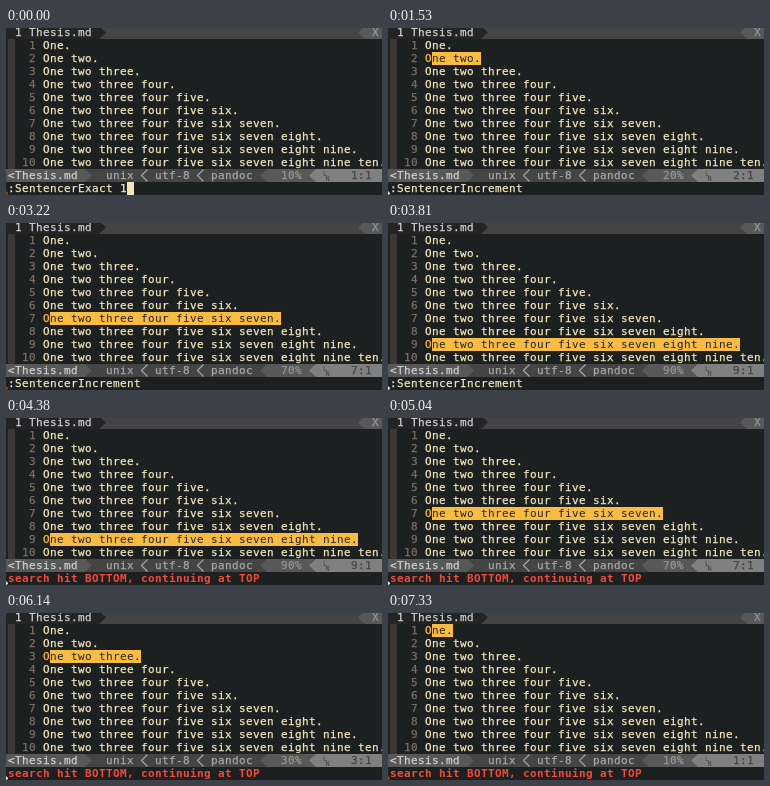
These frames come from a looping animation (376 by 167 pixels, 7.43 s). An HTML page with a canvas:

```html
<!DOCTYPE html>
<html lang="en">
<head>
<meta charset="utf-8">
<title>Sentence stepping</title>
<style>
html, body { margin: 0; width: 100%; height: 100%; overflow: hidden; background: #1d2021; }
canvas { display: block; }
</style>
</head>
<body>
<canvas id="stage" width="376" height="167"></canvas>
<script>
const ctx = document.getElementById('stage').getContext('2d');
const LOOP = 7430, CELL = 7, ROW = 13, LEFT = 2, TOP = -2;
const FONT = '11px "DejaVu Sans Mono", monospace';
const BG = '#1d2021', FG = '#f2e5bc', YELLOW = '#f9bc41', RED = '#f44a37';
const STATUS = 11, COMMAND = 12;

const words = 'One two three four five six seven eight nine ten'.split(' ');
const sentences = words.map((_, i) => words.slice(0, i + 1).join(' ') + '.');

// Moments at which the selection moves: down to line 10, then back up.
const down = [660, 1530, 1880, 2240, 2570, 2860, 3100, 3430, 3660, 3990];
const up = [4380, 4710, 5040, 5300, 5600, 5900, 6140, 6430, 6730];

const x = col => LEFT + col * CELL;
const y = row => TOP + row * ROW;

function fill(col, row, cols, color, rows = 1) {
  ctx.fillStyle = color;
  ctx.fillRect(x(col), y(row), cols * CELL, rows * ROW);
}

// Light text gets a hairline outline, as font smoothing thickens it.
function text(str, col, row, color, bold) {
  ctx.font = (bold ? 'bold ' : '') + FONT;
  ctx.fillStyle = ctx.strokeStyle = color;
  ctx.lineWidth = 0.25;
  [...str].forEach((ch, i) => {
    ctx.fillText(ch, x(col + i), y(row) + 10);
    if (color !== BG && !bold) ctx.strokeText(ch, x(col + i), y(row) + 10);
  });
}

// Triangle separator pointing right (dir 1) or left (dir -1).
function arrow(col, row, dir, color) {
  const base = dir > 0 ? x(col) : x(col + 1);
  ctx.beginPath();
  ctx.moveTo(base, y(row));
  ctx.lineTo(base + dir * CELL, y(row) + ROW / 2);
  ctx.lineTo(base, y(row) + ROW);
  ctx.fillStyle = color;
  ctx.fill();
}

function chevron(col, row, color) {
  ctx.beginPath();
  ctx.moveTo(x(col + 1) - 0.5, y(row) + 0.5);
  ctx.lineTo(x(col) + 0.5, y(row) + ROW / 2);
  ctx.lineTo(x(col + 1) - 0.5, y(row) + ROW - 0.5);
  ctx.strokeStyle = color;
  ctx.lineWidth = 1.2;
  ctx.stroke();
}

function drawTabs() {
  fill(-1, 0, 56, '#444444');
  fill(-1, 0, 14, '#242424');
  arrow(13, 0, 1, '#242424');
  text('1 Thesis.md', 1, 0, '#d0d0d0');
  arrow(50, 0, -1, '#585858');
  fill(51, 0, 4, '#585858');
  text('X', 52, 0, '#969696');
}

function drawStatus(line) {
  const dim = '#a8a8a8', dark = '#444444';
  fill(-1, STATUS, 56, dark);
  fill(-1, STATUS, 12, '#585858');
  arrow(11, STATUS, 1, '#585858');
  text('<Thesis.md', 0, STATUS, '#d0d0d0');
  text('unix', 14, STATUS, dim);
  chevron(19, STATUS, dim);
  text('utf-8', 21, STATUS, dim);
  chevron(27, STATUS, dim);
  text('pandoc', 29, STATUS, dim);
  arrow(36, STATUS, -1, '#585858');
  fill(37, STATUS, 7, '#585858');
  text((line * 10 + '%').padStart(4), 38, STATUS, '#969696');
  arrow(43, STATUS, -1, '#808080');
  fill(44, STATUS, 11, '#808080');
  ctx.fillStyle = dark;
  ctx.font = '7px "DejaVu Sans Mono", monospace';
  ctx.fillText('L', x(45), y(STATUS) + 7);
  ctx.fillText('N', x(45) + 2.5, y(STATUS) + 12);
  text((line + ':1').padStart(4), 48, STATUS, dark);
}

function drawBuffer(line, selected) {
  fill(0, 1, 1, '#3c3836', 10);
  sentences.forEach((sentence, i) => {
    const row = i + 1, active = selected && row === line;
    text(String(row).padStart(2), 2, row, '#7c6f64');
    if (active) fill(6, row, sentence.length - 1, YELLOW);
    text(sentence[0], 5, row, active ? YELLOW : FG);
    text(sentence.slice(1), 6, row, active ? BG : FG);
  });
}

function drawCommand(t) {
  if (t < down[0]) {
    text(':SentencerExact 1', 0, COMMAND, FG);
    fill(17, COMMAND, 1, FG);
  } else if (t >= down[1] && t < up[0]) {
    text(':SentencerIncrement', 0, COMMAND, FG);
  } else {
    text('search hit BOTTOM, continuing at TOP', 0, COMMAND, RED, true);
  }
}

// Small corner mark that lights up and dims.
function drawMark(t) {
  const lit = (t >= 120 && t < 3220) || (t >= 3810 && t < 7330);
  ctx.beginPath();
  ctx.moveTo(0, 163);
  ctx.lineTo(2, 165);
  ctx.lineTo(2, 166);
  ctx.lineTo(0, 167);
  ctx.fillStyle = lit ? '#e8e8e8' : '#8a4a24';
  ctx.fill();
}

function draw(now) {
  const t = now % LOOP;
  const passed = times => times.filter(at => t >= at).length;
  const line = Math.max(1, passed(down) - passed(up));
  ctx.fillStyle = BG;
  ctx.fillRect(0, 0, 376, 167);
  drawBuffer(line, t >= down[0]);
  drawTabs();
  drawStatus(line);
  drawCommand(t);
  drawMark(t);
  requestAnimationFrame(draw);
}

draw(0);
</script>
</body>
</html>
```
